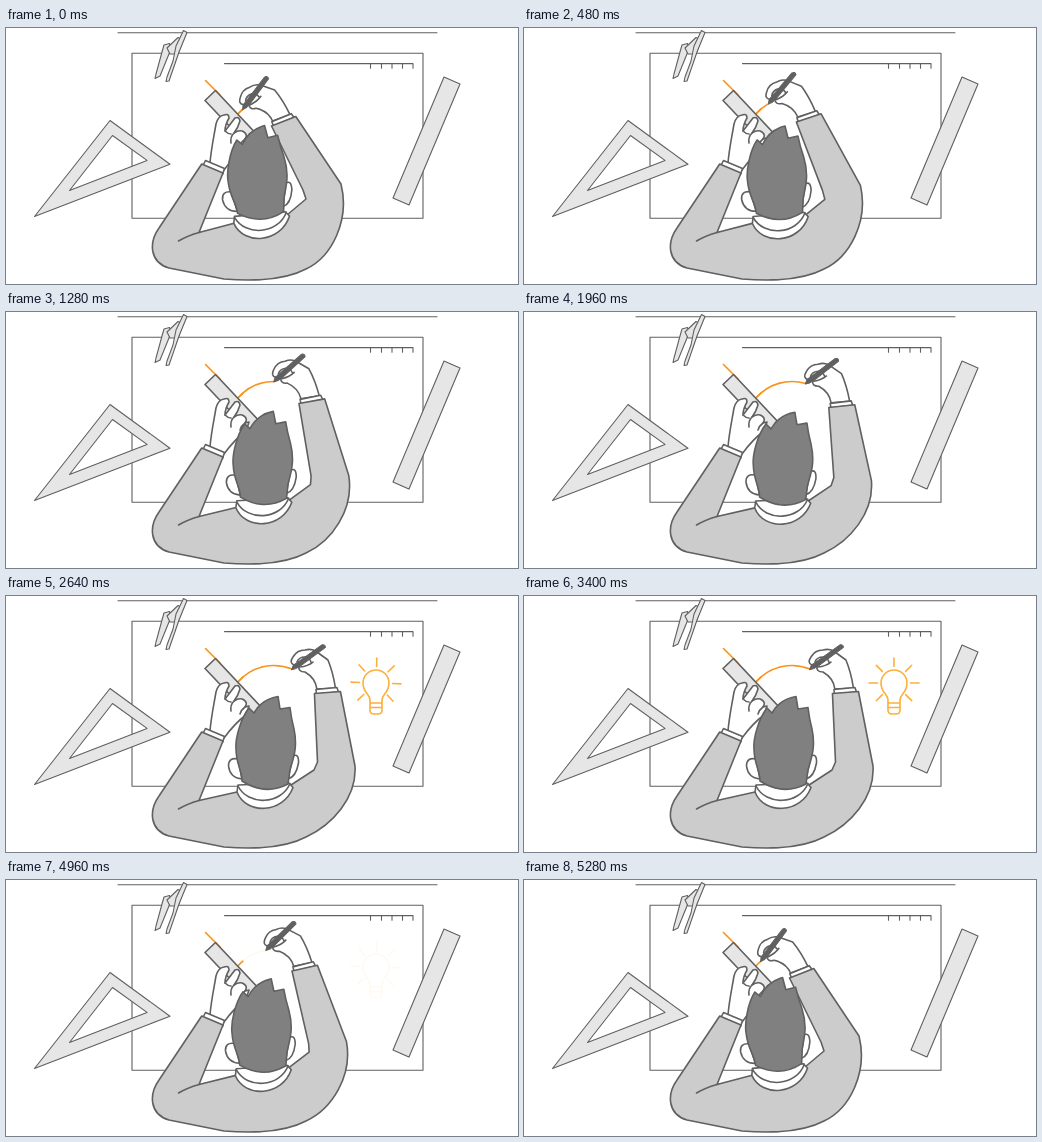
Write an HTML page that moves like this. It is 512 by 256 pixels and loops after 5.76 s.

```html
<!DOCTYPE html>
<html lang="en">
<head>
<meta charset="utf-8">
<title>Drafting desk</title>
<style>
  html, body { margin: 0; width: 100%; height: 100%; overflow: hidden; background: #fff; }
  svg { display: block; width: 100vw; height: 100vh; }
  .line { fill: none; }
  .paper { fill: #fff; }
  .tool { fill: #e6e6e6; }
  .thin { stroke-width: 1.1; }
  .glow { fill: none; stroke: #fbb03b; stroke-width: 1.6; }
  .ink { fill: none; stroke: #f7931e; stroke-width: 1.6; }
</style>
</head>
<body>
<svg viewBox="0 0 512 256" stroke="#606060" stroke-width="1.6" stroke-linejoin="round" stroke-linecap="round">
  <g class="thin">
    <path class="line" d="M112 4.8H431"/>
    <rect class="paper" x="126" y="25.3" width="291" height="165"/>
    <path class="line" d="M218.5 35.6H407M364.5 35.6v4.6M375.5 35.6v4.6M386 35.6v4.6M396.5 35.6v4.6M407 35.6v4.6"/>
    <path class="tool" fill-rule="evenodd" d="M104 92.5L164 136.2L28.5 188.5ZM106.5 107.5L63.5 162.5L141 132.4Z"/>
    <path class="tool" d="M438 49L454 56L403 177L387 170Z"/>
    <path class="tool" d="M158 17L163.5 15.5L165 21L154 48L149 50.5L150 46L156 24Z"/>
    <path class="tool" d="M161 20L172 9.5L177 12L172 26L164 26Z"/>
    <path class="tool" d="M177.5 2.5L181 4.5L173 24L163 53L160 53.5L161 49L167 33L170 18Z"/>
  </g>

  <path class="ink" d="M199.5 52.5L214 67"/>
  <path class="ink" id="start"/>
  <path class="ink" id="arc"/>
  <path class="tool" d="M199 72.5L209.5 62.5L256 112L246 122Z"/>

  <g class="paper">
    <path d="M204 135C205 122 208 108 210 96Q212 88 218 87Q223 85 223 90Q219 97 219 103L229 90Q233 88 234 93Q232 100 228 105Q234 101 238 104Q242 107 239 111L243 110L240 119Q229 127 218 142Z"/>
    <path class="line" d="M219 103Q222 106 225 106M228 105Q224 109 225 115M239 111Q235 114 234 118"/>
    <path d="M199.5 132.5L218.5 140.5L216.5 146.5L196.7 138Z"/>
  </g>

  <g id="hand">
    <path class="paper" d="M311 93C310 86 306 80 299 76Q292 76 293 70L288 69Q283 67 287 61Q291 54 299 54Q306 52 311 56L322 64Q327 76 329.5 92Z"/>
    <path d="M285.6 73.4L287.5 69L292 66L316 48.8Q319.5 48 319.5 51.5L294.5 70L290 72.5Z" fill="#606060" stroke-width="1"/>
    <path class="line" d="M291 66Q293 61 299 61Q304 62 305 66M294 71Q302 70 307 66"/>
    <path class="paper" d="M310 93.5L331 91.5L332.5 96L310.5 98Z"/>
  </g>

  <path id="body" fill="#ccc"/>
  <path class="line" d="M172.5 213Q181 208 193 204.5"/>
  <path id="collar" class="paper" d="M232 189L231 196C240 219 277 218 287 191.5L283 187Z"/>
  <path id="rim" class="line" d="M232 190C242 210 275 209 284 187.5"/>
  <g id="head">
    <path class="paper" d="M232 163Q222.5 161 222.5 170Q224 182 236 183Z"/>
    <path class="paper" d="M287 160Q293 157 292.5 167Q290 181 282 183Z"/>
    <path fill="#808080" d="M236 185C236 174 230 168 230 153C229 142 235 122 243 112L248 117Q256 103 272 100.5L274 113L284 111.5Q285 121 288 133C292 152 287 163 284 174L282 188Q259 200 236 185Z"/>
  </g>

  <g id="bulb">
    <path class="glow" d="M364 107V104C364 98 357 97 357 87A13 13 0 0 1 383 87C383 97 376 98 376 104V107ZM364 107V114Q364 118 368 118H372Q376 118 376 114V107M364 111.5H376"/>
    <path class="glow" id="rays"/>
  </g>
</svg>
<script>
const LOOP = 5760, TIP = [286, 73];
const ARC = { x: 268, y: 117, r: 47.5, from: -139, lo: -131, hi: -67.8 };
const el = id => document.getElementById(id);
const mix = (a, b, p) => a + (b - a) * p;
const clamp = v => Math.max(0, Math.min(1, v));
const span = (t, a, b) => clamp((t - a) / (b - a));
const polar = (cx, cy, r, deg) => {
  const a = deg * Math.PI / 180;
  return [cx + r * Math.cos(a), cy + r * Math.sin(a)];
};
const onArc = deg => polar(ARC.x, ARC.y, ARC.r, deg);
const arcPath = to => `M${onArc(ARC.from)}A${ARC.r} ${ARC.r} 0 0 1 ${onArc(to)}`;
const put = (id, name, value) => el(id).setAttribute(name, value);

// Seven rays, none pointing down at the socket
let rays = '';
for (let i = 0; i < 7; i++) {
  const deg = 180 + 45 * (i - 1);
  rays += `M${polar(370, 87, 16.5, deg)}L${polar(370, 87, 25, deg)}`;
}
put('rays', 'd', rays);
put('start', 'd', arcPath(ARC.lo));

function pose(t) {
  if (t < 2600) return Math.sin(span(t, 200, 2600) * Math.PI / 2);
  return (1 + Math.cos(span(t, 4680, 5240) * Math.PI)) / 2;
}

function bodyPath(p, tip, turn) {
  const a = turn * Math.PI / 180, c = Math.cos(a), s = Math.sin(a);
  const wrist = (x, y) => {
    const dx = x - TIP[0], dy = y - TIP[1];
    return [tip[0] + dx * c - dy * s, tip[1] + dx * s + dy * c];
  };
  const q = p ** 1.35; // the elbow trails the hand
  const pt = (x0, y0, x1, y1) => [mix(x0, x1, q), mix(y0, y1, q)];
  return `M195.7 136L153 200C143 214 143 234 163 240L218 251C255 254 283 250 300 241` +
    `C${pt(326, 229, 326, 229)} ${pt(344, 192, 351, 202)} ${pt(335, 156, 349, 170)}` +
    `L${wrist(334.5, 95.5)}L${wrist(308.5, 97.5)}` +
    `L${pt(297, 162, 311.5, 166)}L${pt(300, 171, 308, 174)}` +
    `L${pt(281, 187, 285, 189)}L${pt(256, 208, 259, 209)}L${pt(229, 195, 231, 196)}` +
    `L193 204.5L217 145Z`;
}

function draw(t) {
  const p = pose(t), back = p - 1;
  const deg = mix(ARC.lo, ARC.hi, p), tip = onArc(deg), turn = 17 * back;
  const shift = `translate(${3 * back} ${2 * back}) `;
  const out = 1 - span(t, 4400, 5000);

  put('hand', 'transform', `translate(${tip}) rotate(${turn}) translate(${-TIP[0]} ${-TIP[1]})`);
  put('body', 'd', bodyPath(p, tip, turn));
  put('head', 'transform', shift + `rotate(${6 * back} 258 200)`);
  for (const id of ['collar', 'rim']) put(id, 'transform', shift + `rotate(${3 * back} 258 200)`);

  put('arc', 'd', arcPath(t < 4400 ? deg : ARC.hi));
  put('arc', 'opacity', t < 5000 ? out : 0);
  put('bulb', 'opacity', span(t, 2000, 2560) * out);
  const sway = 12 * Math.sin((t - 2600) / 1600 * 2 * Math.PI);
  put('rays', 'transform', `rotate(${sway} 370 87)`);
}

const begin = performance.now();
function tick() {
  draw((performance.now() - begin) % LOOP);
  requestAnimationFrame(tick);
}
tick();
</script>
</body>
</html>
```
